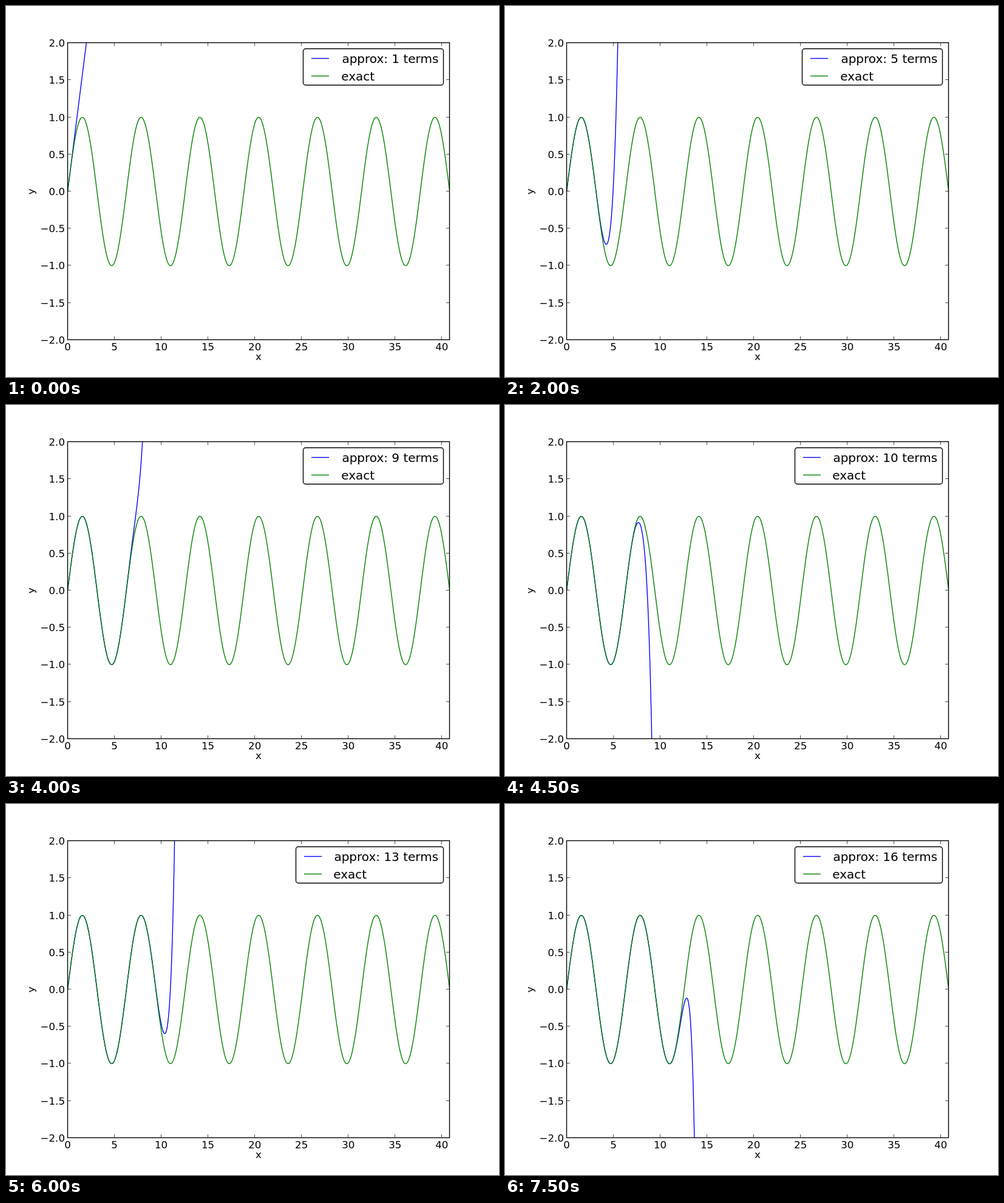
Write an HTML page that moves like this. It is 812 px wide and 612 px high and loops after 8000 ms.

```html
<!DOCTYPE html>
<html lang="en">
<head>
<meta charset="utf-8">
<title>Sine series</title>
<style>
  html, body { margin: 0; width: 100%; height: 100%; overflow: hidden; background: #fff; }
  svg { display: block; width: 812px; height: 612px; }
  text { font-family: "DejaVu Sans", sans-serif; font-size: 16.67px; fill: #000; }
  .legend text { font-size: 20px; }
  .curve { fill: none; stroke-width: 1.39; stroke-linejoin: round; }
  .approx { stroke: #00f; }
  .exact { stroke: #008000; }
  .frame { stroke: #000; stroke-width: 1.39; }
  .tick { stroke: #000; stroke-width: 0.69; }
</style>
</head>
<body>
<svg viewBox="0 0 812 612">
  <clipPath id="plot"><rect x="102" y="61" width="629" height="490"/></clipPath>
  <rect width="812" height="612" fill="#fff"/>
  <g clip-path="url(#plot)">
    <path id="approx" class="curve approx"/>
    <path id="exact" class="curve exact"/>
  </g>
  <g id="axes"></g>
  <rect class="frame" x="101.5" y="60.5" width="629" height="490" fill="none"/>
  <text x="416" y="584" text-anchor="middle">x</text>
  <text transform="translate(47 306) rotate(-90)" text-anchor="middle">y</text>
  <g class="legend">
    <rect id="box" class="frame" y="70.5" height="60" rx="4" fill="#fff"/>
    <g id="keys">
      <path class="curve approx" d="M503 86.5h29"/>
      <path class="curve exact" d="M503 115.5h29"/>
    </g>
    <g id="labels">
      <text id="terms" x="553.4" y="94"></text>
      <text x="552.3" y="123">exact</text>
    </g>
  </g>
</svg>
<script>
const STEP_MS = 500, STEPS = 16;
const X_MAX = 13 * Math.PI, SAMPLES = 1000;
const byId = id => document.getElementById(id);
const toX = x => 101.5 + x / X_MAX * 629.3;
const toY = y => 306 - y * 122.4;

function add(parent, name, attrs, text = "") {
  const node = document.createElementNS("http://www.w3.org/2000/svg", name);
  for (const key in attrs) node.setAttribute(key, attrs[key]);
  node.textContent = text;
  parent.append(node);
}

function curve(fn) {
  const points = [];
  for (let i = 0; i <= SAMPLES; i++) {
    const x = X_MAX * i / SAMPLES, y = fn(x);
    points.push(toX(x).toFixed(2) + " " + toY(y).toFixed(2));
    if (Math.abs(y) > 4) break;
  }
  return "M" + points.join("L");
}

function series(x, count) {
  let term = x, sum = x;
  for (let k = 1; k < count; k++) {
    term *= -x * x / (2 * k * (2 * k + 1));
    sum += term;
  }
  return sum;
}

function drawAxes() {
  const axes = byId("axes");
  for (let v = 0; v <= 40; v += 5) {
    const x = Math.round(toX(v)) - 0.5;
    add(axes, "path", { class: "tick", d: `M${x} 550.5v-5.5M${x} 60.5v5.5` });
    add(axes, "text", { x: toX(v), y: 568, "text-anchor": "middle" }, v);
  }
  for (let v = -2; v <= 2; v += 0.5) {
    const y = Math.round(toY(v)) - 0.5;
    add(axes, "path", { class: "tick", d: `M101.5 ${y}h5.5M730.5 ${y}h-5.5` });
    add(axes, "text", { x: 97, y: y + 6.5, "text-anchor": "end" },
      v.toFixed(1).replace("-", "\u2212"));
  }
}

let shown = 0;
function render(ms) {
  const count = 1 + Math.floor(ms / STEP_MS) % STEPS;
  if (count !== shown) {
    shown = count;
    const wide = count > 9 ? 1 : 0;
    byId("approx").setAttribute("d", curve(x => series(x, count)));
    byId("terms").textContent = `approx: ${count} terms`;
    byId("box").setAttribute("x", 489.5 - 12 * wide);
    byId("box").setAttribute("width", 231 + 12 * wide);
    byId("keys").setAttribute("transform", `translate(${-12 * wide} 0)`);
    byId("labels").setAttribute("transform", `translate(${-13 * wide} 0)`);
  }
}

drawAxes();
byId("exact").setAttribute("d", curve(Math.sin));
const start = performance.now();
function tick() {
  render(performance.now() - start);
  requestAnimationFrame(tick);
}
tick();
</script>
</body>
</html>
```
